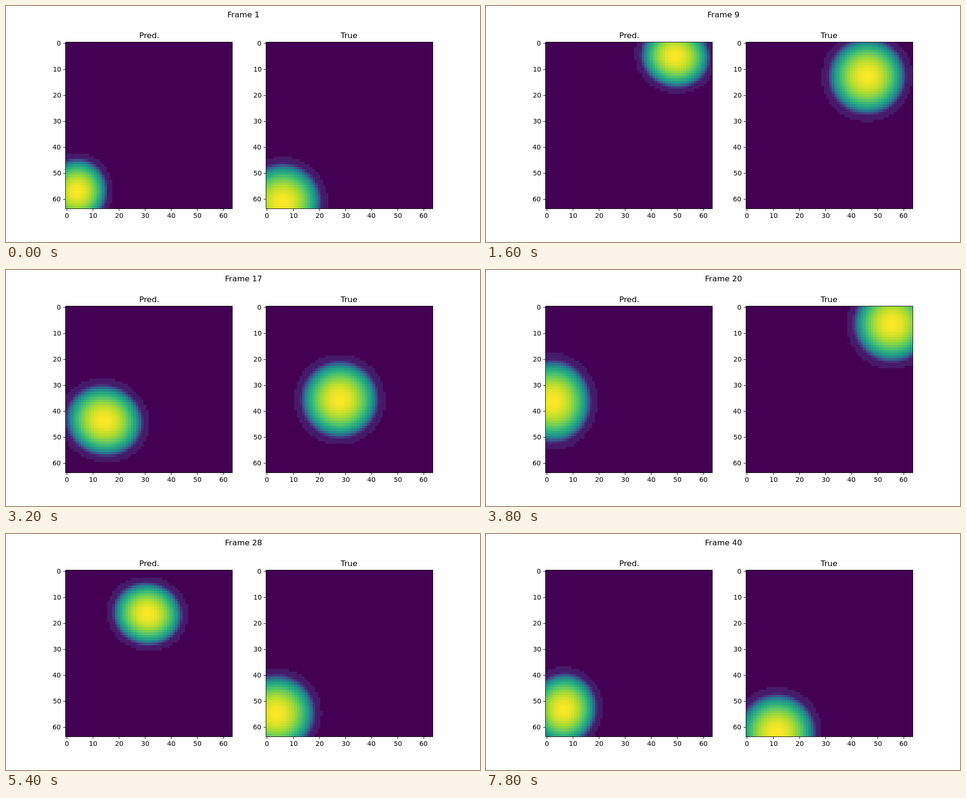
These frames come from a looping animation (1000x500 px, 8000 ms). An HTML page with a canvas:

```html
<!DOCTYPE html>
<html lang="en">
<head>
<meta charset="utf-8">
<title>Pred. / True</title>
<style>
html, body { margin: 0; width: 100%; height: 100%; overflow: hidden; background: #fefefe; }
canvas { display: block; }
</style>
</head>
<body>
<canvas id="stage" width="1000" height="500"></canvas>
<script>
const ctx = document.getElementById('stage').getContext('2d');
const STEP = 200, COUNT = 40, N = 64;
const SIZE = 352.27, CELL = SIZE / N, TOP = 76.36, LEFT = 125, RIGHT = 547.73;

const VIRIDIS = [[68, 1, 84], [71, 45, 123], [59, 82, 139], [44, 114, 142], [33, 145, 140],
  [40, 174, 128], [94, 201, 98], [173, 220, 48], [253, 231, 37]];

const mix = (a, b, k) => a + (b - a) * k;
const snap = v => Math.floor(v + .5) + .5;
const linear = k => k;
const swing = k => (1 - Math.cos(Math.PI * k)) / 2;

// Value at time t between [time, value] key points
function follow(keys, t, ease = linear) {
  let i = 1;
  while (i < keys.length - 1 && keys[i][0] < t) i++;
  const [t0, v0] = keys[i - 1], [t1, v1] = keys[i];
  return mix(v0, v1, ease(Math.min(1, Math.max(0, (t - t0) / (t1 - t0)))));
}

// Predicted blob: x swings between turning points, y moves straight
const predX = t => follow([[1, 4], [10.7, 53], [20, 2.5], [30, 34], [40, 6.5]], t, swing);
const predY = t => follow([[1, 57], [9, 5], [14.2, 50.5], [28, 16.4], [33, 35.6], [40, 53]], t);
const predR = t => follow([[1, 13.6], [13, 14.7], [20, 17], [28, 14.3], [33, 15.6], [40, 14.9]], t);

// The predicted blob is smeared along its direction of travel
function predBlob(t) {
  const vx = predX(t + .5) - predX(t - .5), vy = predY(t + .5) - predY(t - .5);
  const speed = Math.hypot(vx, vy) || 1;
  return { x: predX(t), y: predY(t), r: predR(t), ux: vx / speed, uy: vy / speed, smear: .17 };
}

// The true blob bounces between 0 and 63 at constant speed
function bounce(u) {
  u %= 126;
  return u > 63 ? 126 - u : u;
}

function trueBlob(t) {
  const n = t - 1;
  return { x: bounce(6 + 9.244 * n), y: bounce(61 + 9.718 * n), r: 17.45, ux: 0, uy: 0, smear: 0 };
}

// Domed brightness with a soft rim and a faint halo, q = relative radius
function brightness(q) {
  const rim = 1 / (1 + Math.exp((q - .83) / .04));
  return Math.max(.07, (1 - .91 * q * q) * rim);
}

function color(v) {
  const p = v * 8, i = Math.min(7, Math.floor(p));
  return `rgb(${VIRIDIS[i].map((c, j) => Math.round(mix(c, VIRIDIS[i + 1][j], p - i)))})`;
}

// Anchor: 0 left, .5 centre, 1 right, measured on the ink and set on whole pixels
function text(str, x, y, size, anchor) {
  ctx.font = `${size}px "DejaVu Sans", sans-serif`;
  ctx.fillStyle = '#000';
  const m = ctx.measureText(str);
  const ink = m.actualBoundingBoxLeft + m.actualBoundingBoxRight;
  ctx.fillText(str, Math.round(x - ink * anchor), y);
}

function line(x1, y1, x2, y2) {
  ctx.beginPath();
  ctx.moveTo(x1, y1);
  ctx.lineTo(x2, y2);
  ctx.stroke();
}

function drawPanel(left, title, blob) {
  const ex = i => Math.round(left + i * CELL), ey = i => Math.round(TOP + i * CELL);
  ctx.fillStyle = color(0);
  ctx.fillRect(ex(0), ey(0), ex(N) - ex(0), ey(N) - ey(0));
  for (let j = 0; j < N; j++) {
    for (let i = 0; i < N; i++) {
      const dx = i - blob.x, dy = j - blob.y, along = dx * blob.ux + dy * blob.uy;
      const q = Math.sqrt(dx * dx + dy * dy - blob.smear * along * along) / blob.r;
      if (q > 1) continue;
      ctx.fillStyle = color(brightness(q));
      ctx.fillRect(ex(i), ey(j), ex(i + 1) - ex(i), ey(j + 1) - ey(j));
    }
  }

  const x0 = snap(left), y0 = snap(TOP), x1 = snap(left + SIZE), y1 = snap(TOP + SIZE);
  ctx.strokeStyle = '#000';
  ctx.lineWidth = 1;
  ctx.strokeRect(x0, y0, x1 - x0, y1 - y0);
  for (let v = 0; v <= 60; v += 10) {
    const off = (v + .5) * CELL, tx = left + off, ty = TOP + off;
    line(snap(tx), y1, snap(tx), y1 + 4.86);
    line(x0 - 4.86, snap(ty), x0, snap(ty));
    text(v, tx, 449, 13.89, .5);
    text(v, left - 9.7, Math.round(ty + 5), 13.89, 1);
  }
  text(title, left + SIZE / 2, 68, 16.67, .5);
}

function draw(step) {
  ctx.fillStyle = '#fefefe';
  ctx.fillRect(0, 0, 1000, 500);
  text('Frame ' + step, 500, 24, 16.67, .5);
  drawPanel(LEFT, 'Pred.', predBlob(step));
  drawPanel(RIGHT, 'True', trueBlob(step));
}

let shown = 0;
function tick() {
  const step = Math.floor(performance.now() / STEP) % COUNT + 1;
  if (step !== shown) draw(shown = step);
  requestAnimationFrame(tick);
}
tick();
</script>
</body>
</html>
```
